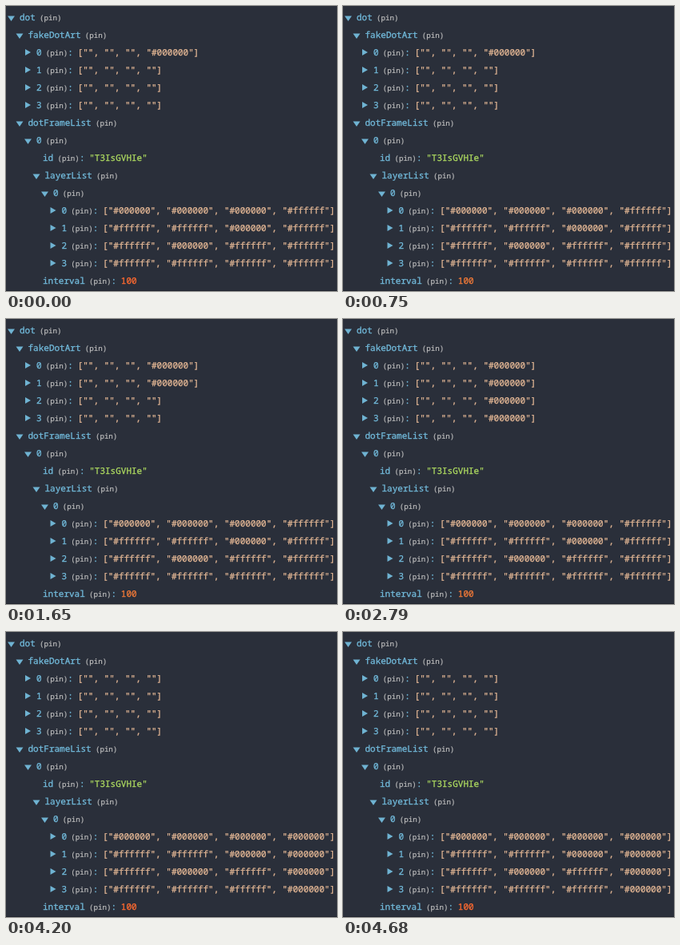
Write an HTML page that moves like this. It is 414 px wide and 357 px high and loops after 5520 ms.

```html
<!DOCTYPE html>
<html lang="en">
<head>
<meta charset="utf-8">
<title>State tree</title>
<style>
  html, body { margin: 0; width: 100%; height: 100%; overflow: hidden; background: #2a2f3a; }
  svg { display: block; }
  text {
    font: 11px "Noto Sans Mono", "DejaVu Sans Mono", monospace;
    text-rendering: geometricPrecision;
    white-space: pre;
    fill: currentColor;
    stroke: currentColor;
    stroke-width: .3px;
  }
  .key { color: #72bbdc; }
  .arrow { fill: #6fb3d2; }
  .pin { color: #bebebe; font-size: 9.17px; stroke-width: .2px; }
  .list { color: #e2b694; }
  .str { color: #aedb60; }
  .num { color: #ff6a30; animation: tint 5520ms step-end infinite; }

  /* --on picks which of two endings a row shows */
  .swap { --on: 0; animation: 5520ms step-end infinite; }
  .on { opacity: var(--on); }
  .off { opacity: calc(1 - var(--on)); }
  .art0 { animation-name: art0; }
  .art1 { animation-name: art1; }
  .art2 { animation-name: art2; }
  .art3 { animation-name: art3; }
  .layer { animation-name: layer; }

  @keyframes art0 { 0% { --on: 1 } 66.3043%, 100% { --on: 0 } }
  @keyframes art1 { 0%, 66.3043%, 100% { --on: 0 } 23.913% { --on: 1 } }
  @keyframes art2 { 0%, 66.3043%, 100% { --on: 0 } 36.9565% { --on: 1 } }
  @keyframes art3 { 0%, 66.3043%, 100% { --on: 0 } 50.5435% { --on: 1 } }
  @keyframes layer { 0% { --on: 0 } 66.3043%, 100% { --on: 1 } }
  @keyframes tint {
    0%, 12.5%, 20.6522%, 76.087%, 84.7826%, 100% { color: #ff6a30 }
    11.9565%, 13.587%, 29.8913%, 77.7174% { color: #f27a38 }
  }
</style>
</head>
<body>
<svg id="tree" width="414" height="357" viewBox="0 0 414 357"></svg>
<script>
  const CHAR = 6.6, PIN = 27.5, GAP = 5.2, LINE = 22;
  const tree = document.getElementById('tree');
  let y = 18;

  function add(parent, tag, attrs, text = '') {
    const el = document.createElementNS('http://www.w3.org/2000/svg', tag);
    for (const name in attrs) el.setAttribute(name, attrs[name]);
    el.textContent = text;
    return parent.appendChild(el);
  }

  const write = (parent, cls, x, text) => add(parent, 'text', { class: cls, x, y }, text);

  function arrow(x, open) {
    const d = open
      ? `M${x - 15} ${y - 5.5}h9l-4.5 6.5z`
      : `M${x - 14} ${y - 8}v8l7-4z`;
    add(tree, 'path', { class: 'arrow', d });
  }

  // Writes the label and returns the x where its value starts
  function label(x, key, colon) {
    write(tree, 'key', x, key);
    x += key.length * CHAR + GAP;
    write(tree, 'pin', x, '(pin)');
    x += PIN;
    if (colon) write(tree, 'key', x, ':');
    return x + CHAR + 5.7;
  }

  const indent = level => 17 + level * 10.5;

  function branch(level, key) {
    arrow(indent(level), true);
    label(indent(level), key, false);
    y += LINE;
  }

  function leaf(key, cls, value) {
    write(tree, cls, label(46, key, true), value);
    y += LINE;
  }

  function list(level, key, cls, head, on, off) {
    arrow(indent(level), false);
    const x = label(indent(level), key, true);
    const row = add(tree, 'g', { class: 'swap ' + cls });
    const tail = x + head.length * CHAR;
    write(row, 'list', x, head);
    write(row, 'list on', tail, on);
    write(row, 'list off', tail, off);
    y += LINE;
  }

  const BLACK = '000000', WHITE = 'ffffff';
  const layers = ['000', '110', '101', '111'];

  branch(0, 'dot');
  branch(1, 'fakeDotArt');
  for (let i = 0; i < 4; i++) {
    list(2, String(i), 'art' + i, '["", "", "", "', '#000000"]', '"]');
  }
  branch(1, 'dotFrameList');
  branch(2, '0');
  leaf('id', 'str', '"T3IsGVHIe"');
  branch(3, 'layerList');
  branch(4, '0');
  layers.forEach((bits, i) => {
    const cells = [...bits].map(b => `"#${b === '1' ? WHITE : BLACK}", `).join('');
    list(5, String(i), 'layer', `[${cells}"#`, BLACK + '"]', WHITE + '"]');
  });
  leaf('interval', 'num', '100');
  add(tree, 'rect', { x: 0, y: 356, width: 414, height: 1, fill: '#20242d' });
</script>
</body>
</html>
```
